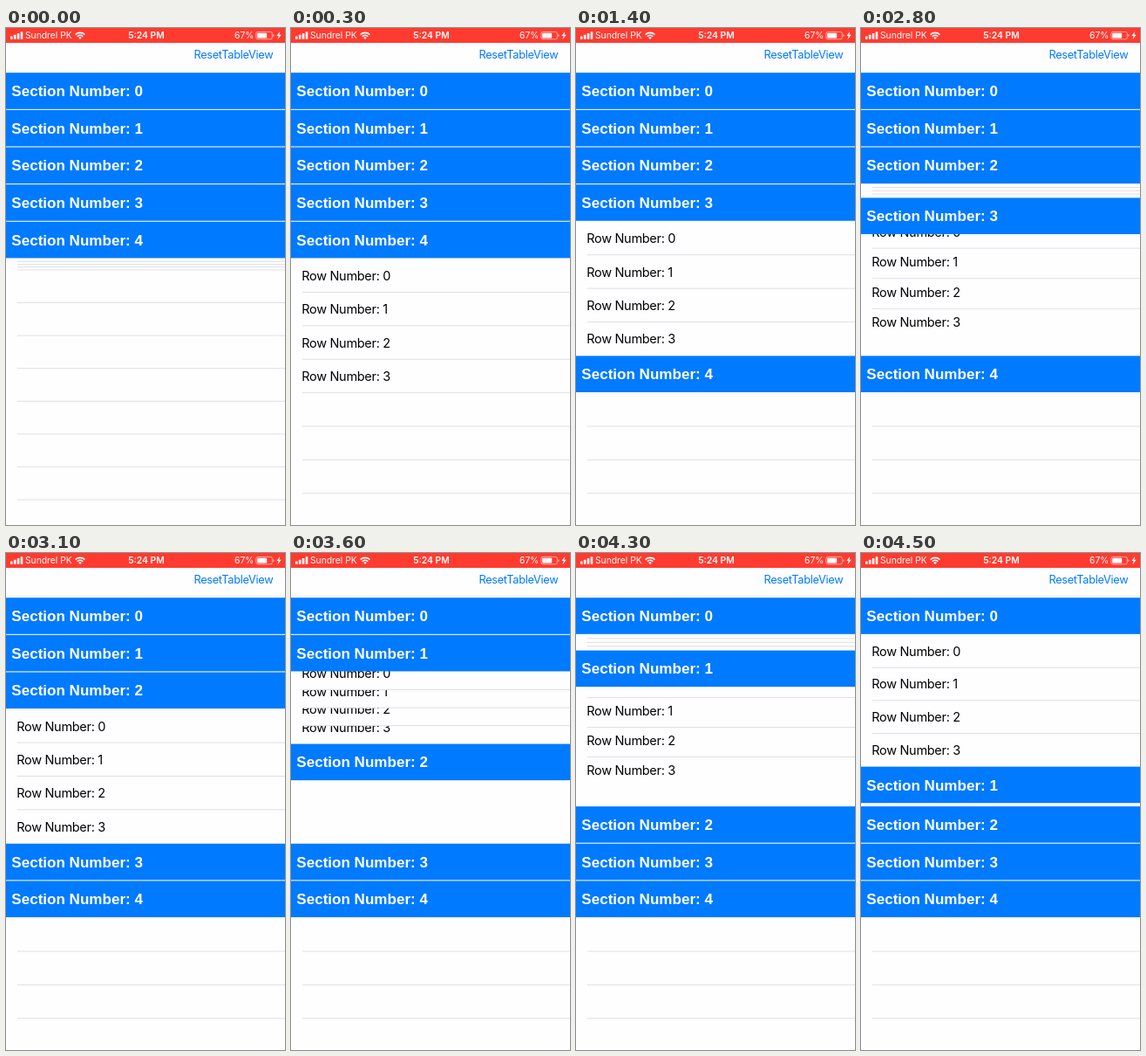
Write an HTML page that moves like this. It is 320 by 569 pixels and loops after 4600 ms.

```html
<!DOCTYPE html>
<html lang="en">
<head>
<meta charset="utf-8">
<title>Accordion table</title>
<style>
  html, body { margin: 0; width: 100%; height: 100%; overflow: hidden; background: #fefdff; }
  svg { display: block; width: 100%; height: 100%; }
  text { font-family: Inter, Roboto, sans-serif; white-space: pre; }
  .cell { fill: #fefdff; }
  .rule { fill: #dddcdf; }
  .row text { font-size: 14.5px; letter-spacing: -.3px; fill: #000; }
  .head rect { fill: #007aff; }
  .head text { font: bold 17.06px "Liberation Sans", Arial, sans-serif; fill: #fff; }
  .reset { font-size: 12.8px; letter-spacing: -.32px; fill: #007aff; text-anchor: end; }
  .status { fill: #fff; font-size: 10.3px; }
  .time { font-weight: 600; text-anchor: middle; }
  .stroke { fill: none; stroke: #fff; }
</style>
</head>
<body>
<svg id="stage" viewBox="0 0 320 569">
  <g id="blanks"></g>
  <g id="rows"></g>
  <g id="heads"></g>
  <rect class="cell" y="17" width="320" height="34"/>
  <text class="reset" x="306.3" y="34.7">ResetTableView</text>
  <rect width="320" height="17" fill="#ff3b30"/>
  <g class="status">
    <rect x="5" y="9.4" width="2.6" height="3.4" rx=".5"/>
    <rect x="8.9" y="7.8" width="2.6" height="5" rx=".5"/>
    <rect x="12.8" y="6" width="2.6" height="6.8" rx=".5"/>
    <rect x="16.7" y="4.3" width="2.6" height="8.5" rx=".5"/>
    <text x="22" y="12.3">Sundrel PK</text>
    <g class="stroke" stroke-width="1.6">
      <path d="M79.6 7.6a7.6 7.6 0 0 1 10.8 0M81.7 9.7a4.7 4.7 0 0 1 6.6 0"/>
    </g>
    <path d="M83.1 11a2.7 2.7 0 0 1 3.8 0L85 13z"/>
    <text class="time" x="161" y="12.3">5:24 PM</text>
    <text x="262" y="12.3">67%</text>
    <rect class="stroke" x="286.9" y="4.4" width="18.4" height="8.4" rx="2" stroke-width=".8" opacity=".7"/>
    <rect x="288.2" y="5.7" width="11" height="5.8" rx=".8"/>
    <path d="M306.3 7v3.2q1.4-.5 1.4-1.6t-1.4-1.6z" opacity=".7"/>
    <path d="M314.4 3.8l-4 5.2h2.3l-1.2 4.2 4.2-5.5h-2.4z"/>
  </g>
</svg>
<script>
const SECTIONS = 5, ROWS = 4, BLANKS = 7, NONE = SECTIONS;
const TOP = 51.2, HEAD = 42.65, ROW = 38.4, BODY = ROWS * ROW;
const LOOP = 4600, STEP = 100, DURATION = 300;

// at: first visible step; lead: time already elapsed at that step
const moves = [
  { at: 0, lead: 61, from: NONE, to: 4 },
  { at: 1100, lead: 70, from: 4, to: 3 },
  { at: 2800, lead: 66, from: 3, to: 2 },
  { at: 3500, lead: 56, from: 2, to: 1 },
  { at: 4300, lead: 71, from: 1, to: 0 }
];

const byId = id => document.getElementById(id);
const range = n => [...Array(n).keys()];
const mix = (a, b, p) => a + (b - a) * p;
const place = (el, y) => el.setAttribute('transform', `translate(0 ${y.toFixed(2)})`);

function add(parent, tag, attrs = {}, text = '') {
  const el = document.createElementNS('http://www.w3.org/2000/svg', tag);
  for (const key in attrs) el.setAttribute(key, attrs[key]);
  el.textContent = text;
  return parent.appendChild(el);
}

const addRule = (parent, y) =>
  add(parent, 'rect', { class: 'rule', x: 12.8, y, width: 307.2, height: .9 });

const blanks = range(BLANKS).map(() => addRule(byId('blanks'), -.9));

const heads = range(SECTIONS).map(i => {
  const g = add(byId('heads'), 'g', { class: 'head' });
  add(g, 'rect', { width: 320, height: 41.6 });
  add(g, 'text', { x: 6.3, y: 26.9 }, `Section Number: ${i}`);
  return g;
});

// Lower sections paint first, and each row slides out from under the one above.
const bodies = [];
for (const i of range(SECTIONS).reverse()) {
  const group = add(byId('rows'), 'g');
  const rows = [];
  for (const k of range(ROWS).reverse()) {
    const g = add(group, 'g', { class: 'row' });
    add(g, 'rect', { class: 'cell', y: -ROW, width: 320, height: ROW });
    add(g, 'text', { x: 12.2, y: -14 }, `Row Number: ${k}`);
    if (k < ROWS - 1 || i === SECTIONS - 1) addRule(g, -.9);
    rows[k] = g;
  }
  bodies[i] = { group, rows };
}

const headTop = (i, open) => TOP + i * HEAD + (i > open ? BODY : 0);

// cubic-bezier(.42, 0, .58, 1), solved by bisection
function ease(x) {
  if (x >= 1) return 1;
  let lo = 0, hi = 1;
  for (let n = 0; n < 24; n++) {
    const s = (lo + hi) / 2, r = 1 - s;
    if (3 * r * r * s * .42 + 3 * r * s * s * .58 + s ** 3 < x) lo = s;
    else hi = s;
  }
  return lo * lo * (3 - 2 * lo);
}

function draw(time) {
  const t = Math.floor(time % LOOP / STEP) * STEP;
  const { at, lead, from, to } = moves.filter(m => m.at <= t).pop();
  const p = ease((t - at + lead) / DURATION);

  heads.forEach((g, i) => place(g, mix(headTop(i, from), headTop(i, to), p)));

  bodies.forEach(({ group, rows }, i) => {
    const opening = i === to, closing = i === from && p < 1;
    group.setAttribute('visibility', opening || closing ? 'visible' : 'hidden');
    const base = TOP + (i + 1) * HEAD;
    rows.forEach((g, k) => {
      const full = base + (k + 1) * ROW;
      place(g, opening ? mix(base, full, p) : mix(full, base - ROW, p));
    });
  });

  const grow = from === NONE ? p : 1;
  const end = TOP + SECTIONS * HEAD + BODY * grow;
  blanks.forEach((el, k) => place(el, end + (k + 1) * mix(37.5, ROW, grow)));
}

const start = performance.now();
function tick() {
  draw(performance.now() - start);
  requestAnimationFrame(tick);
}
tick();
</script>
</body>
</html>
```
